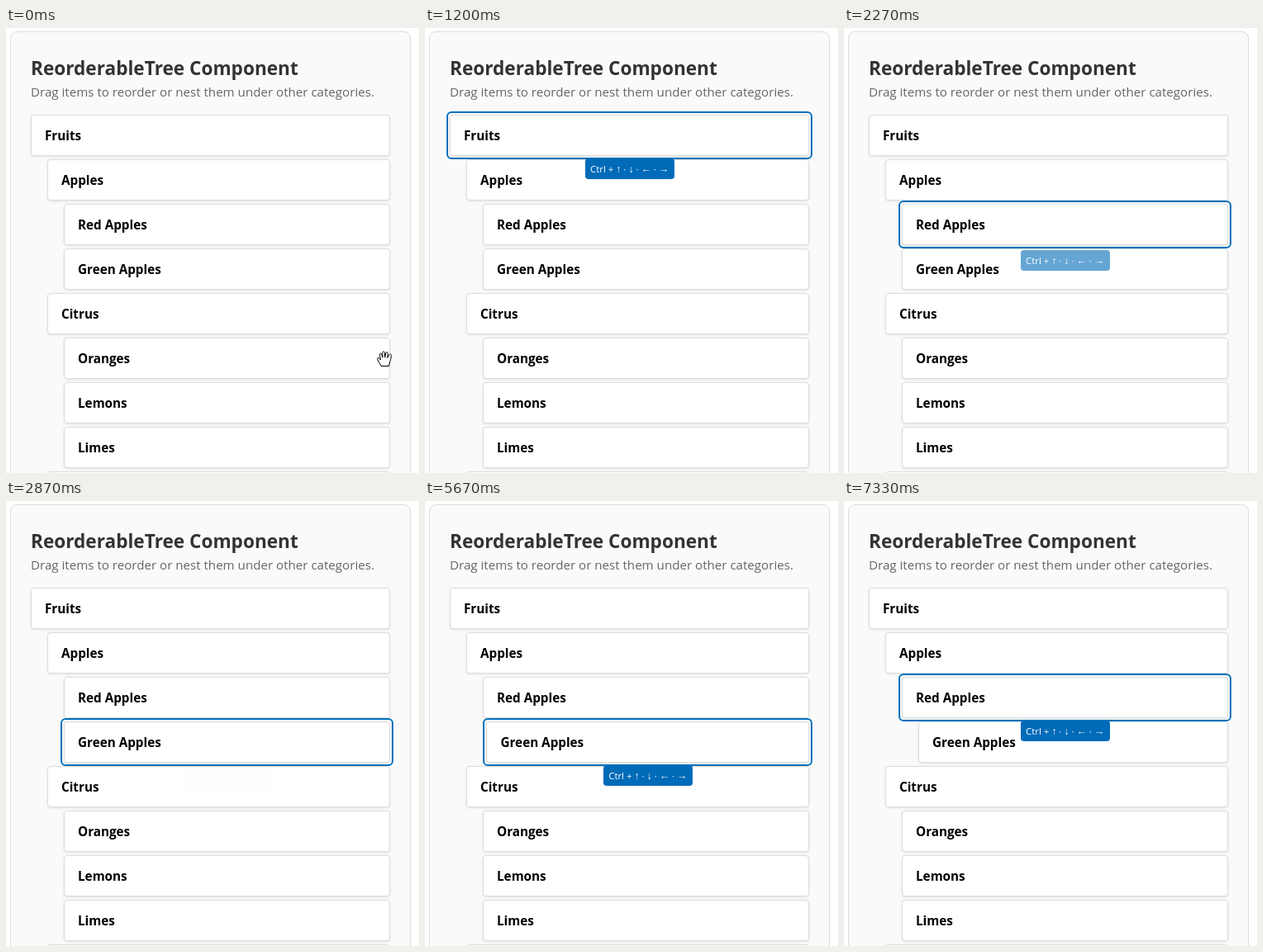
These frames come from a looping animation (500 by 539 pixels, 8000 ms). An HTML page:

```html
<!DOCTYPE html>
<html lang="en">
<head>
<meta charset="utf-8">
<title>Reorderable tree</title>
<style>
  html, body { margin: 0; width: 100%; height: 100%; overflow: hidden; background: #fff; }
  body { position: relative; font-family: "Open Sans", "Noto Sans", sans-serif; }
  body * { box-sizing: border-box; }
  .panel, .card, .ring, .tip, .cursor, h1, p { position: absolute; margin: 0; white-space: nowrap; }
  .panel { left: 5px; top: 4px; width: 485px; height: 600px;
    background: #fafafa; border: 1px solid #ddd; border-radius: 8px; }
  h1 { left: 30px; top: 33px; font-size: 22.6px; line-height: 32px; color: #333; }
  p { left: 30px; top: 65px; font-size: 15.14px; line-height: 24px; color: #666; }
  .card { height: 50px; padding-left: 16px; background: #fff;
    border: 1px solid #ddd; border-radius: 4px; box-shadow: 0 1px 3px rgba(0, 0, 0, .1);
    font-weight: 700; font-size: 15.25px; line-height: 48px; color: #000; }
  .ring { height: 58px; border: 2px solid #0072bc; border-radius: 6px; }
  .tip { width: 108px; height: 25px; border-radius: 4px; background: #006bb8; color: #fff;
    font-size: 11.4px; line-height: 25px; text-align: center; }
  .tip i { font: 12.3px/1 "Liberation Sans", "DejaVu Sans", sans-serif; }
  .cursor { left: 0; top: 0; overflow: visible; }
  .cursor path { fill: #fff; stroke: #000; stroke-linejoin: round; }
</style>
</head>
<body>
<div class="panel"></div>
<h1>ReorderableTree Component</h1>
<p>Drag items to reorder or nest them under other categories.</p>
<div id="tree"></div>
<div class="ring" id="ring"></div>
<div class="tip" id="tip">Ctrl + <i>↑</i> · <i>↓</i> · <i>←</i> · <i>→</i></div>
<svg class="cursor" id="cursor" width="20" height="20">
  <path id="arrow" d="M.5 .5V16.5L4.3 12.9L6.9 18.6L9.2 17.6L6.7 12H11.9Z"/>
  <path id="hand" transform="translate(-9 -10)" d="M5 18.5C4.5 16 1 12.5.8 10C.6 8 2.5 8 3.5 9.5L4.5 11L3.5 5C3 3 5 2.3 5.7 4L7 8L6.8 2.5C6.8.3 9.2.3 9.4 2.5L9.8 8L10.8 2.8C11.2 1 13.5 1.4 13.2 3.4L12.9 8.5L14.8 5C15.7 3.3 18 4.2 17.4 6.2C16.8 9 16.6 12 15.5 14L14.5 18.5Z"/>
</svg>
<script>
const LOOP = 8000, FPS = 15, FADE = 200;
const LEFT = 30, RIGHT = 465, TOP = 105, INDENT = 20, HEIGHT = 50, PITCH = 54;
const TIP_WIDTH = 108, TIP_DROP = 7;
const $ = id => document.getElementById(id);

const rows = [
  ["Fruits", 0], ["Apples", 1], ["Red Apples", 2], ["Green Apples", 2],
  ["Citrus", 1], ["Oranges", 2], ["Lemons", 2], ["Limes", 2], ["Berries", 1]
].map(([name, depth], i) => {
  const card = document.createElement("div");
  card.className = "card";
  card.textContent = name;
  $("tree").append(card);
  return { card, depth, left: LEFT + depth * INDENT, top: TOP + i * PITCH };
});

// Key presses: when a row takes the focus, and when one is nested
const focuses = [
  { time: 990, row: rows[0] },
  { time: 1808, row: rows[1] },
  { time: 2193, row: rows[2] },
  { time: 2866, row: rows[3] },
  { time: 7120, row: rows[2] }
];
const nesting = { time: 5643, row: rows[3] };
const rise = { from: [458, 401], to: [406, 31], duration: 533 };
const leave = { time: 800, speed: .3375, edge: 490 };

const progress = (t, start, duration) => Math.min(Math.max((t - start) / duration, 0), 1);
const easeOut = u => 1 - (1 - u) ** 2;
const easeInOut = u => u * u * (3 - 2 * u);
const show = (el, on) => { el.style.display = on ? "" : "none"; };

function place(el, left, top, right) {
  el.style.left = left + "px";
  el.style.top = top + "px";
  el.style.width = right - left + "px";
}

function drawFocus(t) {
  const focus = focuses.findLast(f => f.time <= t);
  show($("ring"), focus);
  show($("tip"), focus);
  if (!focus) return;
  const { left, top } = focus.row;
  const opacity = easeOut(progress(t, focus.time, FADE));
  const tipLeft = (left + RIGHT - TIP_WIDTH) / 2;
  place($("ring"), left - 4, top - 4, RIGHT + 4);
  place($("tip"), tipLeft, top + HEIGHT + 3 + TIP_DROP * (1 - opacity), tipLeft + TIP_WIDTH);
  $("tip").style.opacity = opacity;
}

function drawCursor(t) {
  const u = easeInOut(progress(t, 0, rise.duration));
  let [x, y] = rise.from.map((a, i) => Math.round(a + (rise.to[i] - a) * u));
  x += Math.round(Math.max(t - leave.time, 0) * leave.speed);
  const overRow = y >= TOP && (y - TOP) % PITCH < HEIGHT;
  $("cursor").style.transform = `translate(${x}px, ${y}px)`;
  show($("cursor"), x < leave.edge);
  show($("hand"), overRow);
  show($("arrow"), !overRow);
}

function draw(t) {
  const shift = INDENT * easeOut(progress(t, nesting.time, FADE));
  nesting.row.left = LEFT + nesting.row.depth * INDENT + shift;
  for (const { card, left, top } of rows) place(card, left, top, RIGHT);
  drawFocus(t);
  drawCursor(t);
}

const start = performance.now();
function frame() {
  const t = (performance.now() - start) % LOOP;
  // The small lead keeps rounded times on their own tick
  draw(Math.floor((t + 4) * FPS / 1000) * 1000 / FPS);
  requestAnimationFrame(frame);
}
frame();
</script>
</body>
</html>
```
